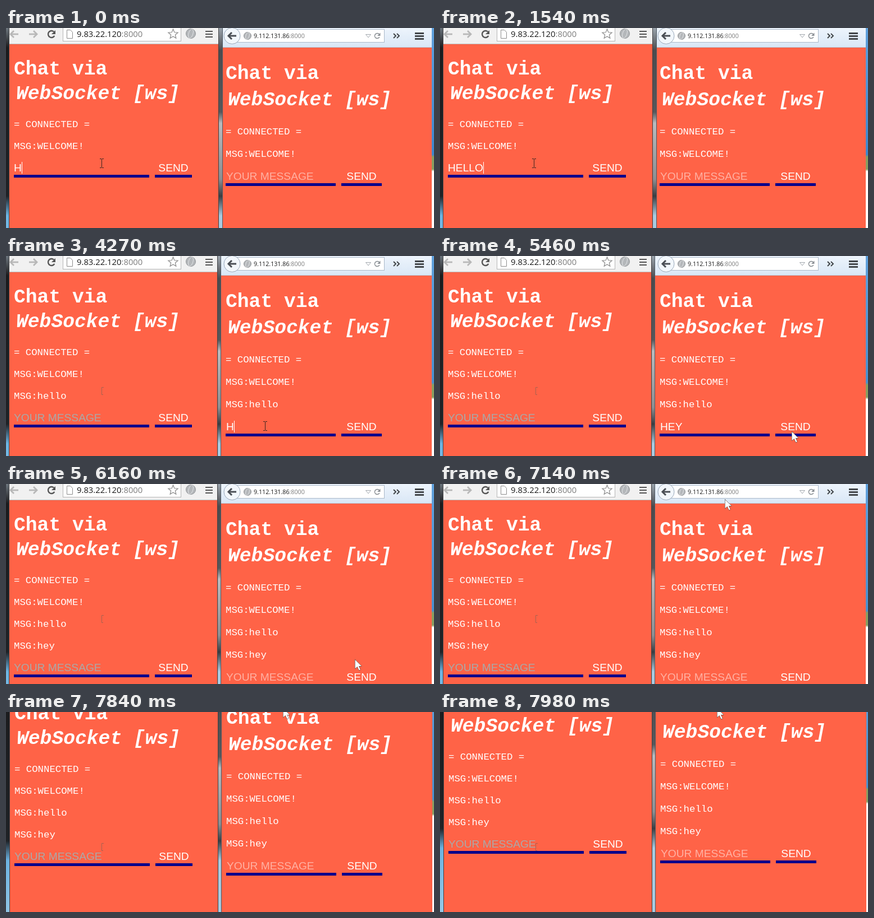
Recreate the animation shown at these times as an HTML page with a canvas. Size 762x357 px, loop 8 s.

```html
<!DOCTYPE html>
<html lang="en">
<head>
<meta charset="utf-8">
<title>Chat via WebSocket</title>
<style>
html, body { margin: 0; width: 100%; height: 100%; overflow: hidden; background: #ff6347; }
canvas { display: block; }
</style>
</head>
<body>
<canvas id="stage" width="762" height="357"></canvas>
<script>
const W = 762, H = 357, LOOP = 8000, STEP = 70, DEEP = 460;
const ctx = document.getElementById('stage').getContext('2d');
const MONO = '"Liberation Mono", monospace';
const SANS = '"Liberation Sans", Arial, sans-serif';
const UI = '"Open Sans", "Noto Sans", sans-serif';
const TOMATO = '#ff6347', NAVY = '#00008b', GREY = '#555';

const clamp = v => Math.max(0, Math.min(1, v));
const within = (t, a, b) => t >= a && t < b;
const typed = (t, word, times) => word.slice(0, times.filter(at => t >= at).length);

// Each glide eases the mouse from where it is to a new resting place.
const GLIDES = [
  { at: 1470, span: 70, to: [167, 241] },
  { at: 1540, span: 630, to: [302, 291] },
  { at: 2870, span: 70, to: [372, 269] },
  { at: 2940, span: 210, to: [461, 303] },
  { at: 4970, span: 490, to: [626, 313] },
  { at: 6090, span: 560, to: [520, 318] },
  { at: 6860, span: 280, to: [507, 27] },
  { at: 7140, span: 280, to: [493, -7] }
];

function mouseAt(t) {
  let pos = [170, 241];
  for (const { at, span, to } of GLIDES) {
    const p = clamp((t - at) / span), ease = p * p * (3 - 2 * p);
    pos = pos.map((v, i) => v + (to[i] - v) * ease);
  }
  return pos.map(Math.round);
}

function scrollAt(t) {
  const p = clamp((t - 7560) / 420);
  return p ? [Math.round(2 - p), Math.round(-92 * (1 - (1 - p) ** 1.3))] : [0, 0];
}

function box(x, y, w, h, color) {
  ctx.fillStyle = color;
  ctx.fillRect(x, y, w, h);
}

function label(str, x, y, font, color = '#fff', align = 'left') {
  ctx.font = font;
  ctx.fillStyle = color;
  ctx.textAlign = align;
  ctx.fillText(str, x, y);
  return x + ctx.measureText(str).width;
}

function line(points, color, width, close) {
  ctx.beginPath();
  points.forEach(([x, y]) => ctx.lineTo(x, y));
  if (close) ctx.closePath();
  ctx.strokeStyle = color;
  ctx.lineWidth = width;
  ctx.stroke();
}

function disc(x, y, r, fill, stroke) {
  ctx.beginPath();
  ctx.arc(x, y, r, 0, Math.PI * 2);
  ctx.fillStyle = fill;
  ctx.fill();
  ctx.strokeStyle = stroke;
  ctx.lineWidth = 1;
  ctx.stroke();
}

// Stops are [y, colour] pairs in stage pixels.
function strip(x, w, h, stops) {
  const g = ctx.createLinearGradient(0, 0, 0, h);
  stops.forEach(([y, c]) => g.addColorStop(y / h, c));
  box(x, 0, w, h, g);
}

function arrow(x, y, dir, color, width) {
  line([[x - 7 * dir, y], [x + 7 * dir, y]], color, width);
  line([[x + dir, y - 6], [x + 7 * dir, y], [x + dir, y + 6]], color, width);
}

function reload(x, y, r, color, width) {
  ctx.beginPath();
  ctx.arc(x, y, r, 0.5, Math.PI * 1.75);
  ctx.strokeStyle = color;
  ctx.lineWidth = width;
  ctx.stroke();
  ctx.beginPath();
  ctx.moveTo(x + r + 1, y - r - 1);
  ctx.lineTo(x + r + 1, y);
  ctx.lineTo(x, y);
  ctx.fillStyle = color;
  ctx.fill();
}

function globe(x, y, r) {
  disc(x, y, r, '#b4b7ba', '#929598');
  ctx.beginPath();
  ctx.ellipse(x, y, r * 0.45, r, 0.3, 0, Math.PI * 2);
  ctx.strokeStyle = '#e4e6e8';
  ctx.stroke();
}

function menu(x, y, w, h, color) {
  for (let i = 0; i < 3; i++) box(x, y + i * 5, w, h, color);
}

function star(x, y, r) {
  const pts = Array.from({ length: 10 }, (_, i) => {
    const a = -Math.PI / 2 + i * Math.PI / 5, d = i % 2 ? r * 0.45 : r;
    return [x + d * Math.cos(a), y + d * Math.sin(a)];
  });
  line(pts, '#8a8a8a', 1.2, true);
}

function address(host, x, y, size) {
  const font = size + 'px ' + UI;
  label(':8000', label(host, x, y, font, '#1a1a1a'), y, font, '#7c7c7c');
}

function desktop(late) {
  strip(-4, 12, DEEP, [[0, '#6b747c'], [35, '#1b1b1d'], [300, '#1f2226'], [335, '#6db4e2'], [DEEP, '#9ccbe5']]);
  strip(376, 12, DEEP, [[0, '#9aa3ac'], [40, '#4a4b4e'], [150, '#55575a'], [170, '#b9bbbe'],
    [270, '#8d8f92'], [300, '#3a3c40'], [335, '#a9cbe0'], [DEEP, '#a9cbe0']]);
  const sky = late ? '#4a8fcc' : '#3f86cb';
  strip(756, 8, DEEP, [[0, '#5fa0dc'], [226, sky], [230, '#8a9d60'], [252, '#8a9d60'], [256, '#fff'], [DEEP, '#fff']]);
}

function leftWindow(edge) {
  box(5, 0, edge - 4, DEEP, '#3f3f42');
  box(6, 0, edge - 6, 29, '#f1f1f1');
  box(6, 28, edge - 6, 1, '#b9b9b9');
  box(6, 29, edge - 6, DEEP, TOMATO);
  arrow(15, 11, -1, '#b8b8b8', 2.8);
  arrow(48, 11, 1, '#b8b8b8', 2.8);
  reload(81, 11, 6, GREY, 2.4);
  box(101, 0, 211, 24, '#b5b5b5');
  box(102, 0, 209, 23, '#fff');
  line([[108.5, 3.5], [114.5, 3.5], [118.5, 7.5], [118.5, 18.5], [108.5, 18.5]], '#8c8c8c', 1, true);
  address('9.83.22.120', 126, 16, 14.8);
  star(297.5, 11, 9);
  globe(329, 10, 8.5);
  menu(355, 5, 13, 2, GREY);
}

function rightWindow(edge) {
  const w = 758 - edge;
  box(edge - 1, 0, w + 1, DEEP, '#4d5964');
  strip(edge, w, 35, [[0, '#edf4fc'], [35, '#d9e7f6']]);
  box(edge, 34, w, 1, '#b7c4d3');
  box(edge, 35, w, DEEP, TOMATO);
  box(404, 2, 270, 24, '#aab8c8');
  box(405, 3, 268, 22, '#fff');
  disc(402.5, 14, 14.5, '#f2f7fc', '#98a7b8');
  arrow(403, 14, -1, '#4a4f55', 3);
  globe(430, 14, 6.5);
  address('9.112.131.86', 441, 18, 10.7);
  line([[640.5, 11.5], [649.5, 11.5], [645, 17]], '#a2a8ae', 1, true);
  reload(661, 14, 4.5, '#8b9095', 1.6);
  for (const x of [690, 696]) line([[x, 10], [x + 4, 14], [x, 18]], '#42464a', 2);
  menu(728, 8, 16, 3, '#42464a');
}

const LEFT = { x: 14, head: 83, lead: 44, top: 177, gap: 39, field: 241, send: 66, pad: 0, hint: '#a9a9a9' };
const RIGHT = { x: 391, head: 91, lead: 47, top: 190, gap: 40, field: 196, send: 72, pad: 1, hint: '#ffb1a3' };

function page({ x, head, lead, top, gap, field, send, pad, hint }, lines, value, caret) {
  label('Chat via', x, head, 'bold 34.67px ' + MONO);
  label('WebSocket [ws]', x + 4, head + lead, 'italic bold 34.67px ' + MONO);
  lines.forEach((s, i) => label(s, x, top + i * gap, '17.33px ' + MONO));

  const base = top + lines.length * gap + 1, bar = base + 6, button = x + field + 10;
  const font = '19.2px ' + SANS;
  const end = label(value || 'YOUR MESSAGE', x + pad, base, font, value ? '#fff' : hint);
  if (caret) box(Math.round(value ? end : x + pad), base - 17, 1, 21, '#fff');
  box(x, bar, field, 5, NAVY);
  box(button, bar, send, 5, NAVY);
  label('SEND', button + send / 2, base, font, '#fff', 'center');
}

function pointer(x, y) {
  const pts = [[0, 0], [0, 16], [4, 12.5], [7, 19], [9.5, 18], [6.6, 11.6], [11.5, 11.5]]
    .map(([a, b]) => [x + a + 0.5, y + b + 0.5]);
  line(pts, '#222', 1, true);
  ctx.fillStyle = '#fff';
  ctx.fill();
}

function beam(x, y) {
  const ink = '#3a2520';
  box(x, y - 7, 1, 15, ink);
  for (const dy of [-8, 8]) {
    box(x - 3, y + dy, 3, 1, ink);
    box(x + 1, y + dy, 3, 1, ink);
  }
}

function draw(now) {
  const t = Math.floor((now % LOOP) / STEP) * STEP;
  const late = t >= 3360;
  const lines = ['= CONNECTED =', 'MSG:WELCOME!'];
  if (t >= 2380) lines.push('MSG:hello');
  if (t >= 5880) lines.push('MSG:hey');

  const hello = t < 2380 ? typed(t, 'HELLO', [0, 70, 280, 420, 560]) : '';
  const hey = t < 5880 ? typed(t, 'HEY', [4270, 4340, 4550]) : '';
  const caretL = t < 1050 || within(t, 1540, 2030);
  const caretR = within(t, 3360, 3850) || within(t, 4270, 5040);

  ctx.setTransform(1, 0, 0, 1, 0, 0);
  box(0, 0, W, H, TOMATO);
  ctx.translate(...scrollAt(t));
  desktop(late);
  leftWindow(late ? 376 : 378);
  rightWindow(late ? 383 : 386);
  page(LEFT, lines, hello, caretL);
  page(RIGHT, lines, hey, caretR);
  ctx.setTransform(1, 0, 0, 1, 0, 0);

  // The text cursor leaves a faint bracket behind on the left page.
  if (t >= 1610) line([[174, 234.5], [170.5, 234.5], [170.5, 247.5], [173, 247.5]], '#a8604f', 1);
  const isBeam = t < 1680 || within(t, 3150, 5180);
  (isBeam ? beam : pointer)(...mouseAt(t));
}

function tick(now) {
  draw(now);
  requestAnimationFrame(tick);
}
draw(0);
requestAnimationFrame(tick);
</script>
</body>
</html>
```
